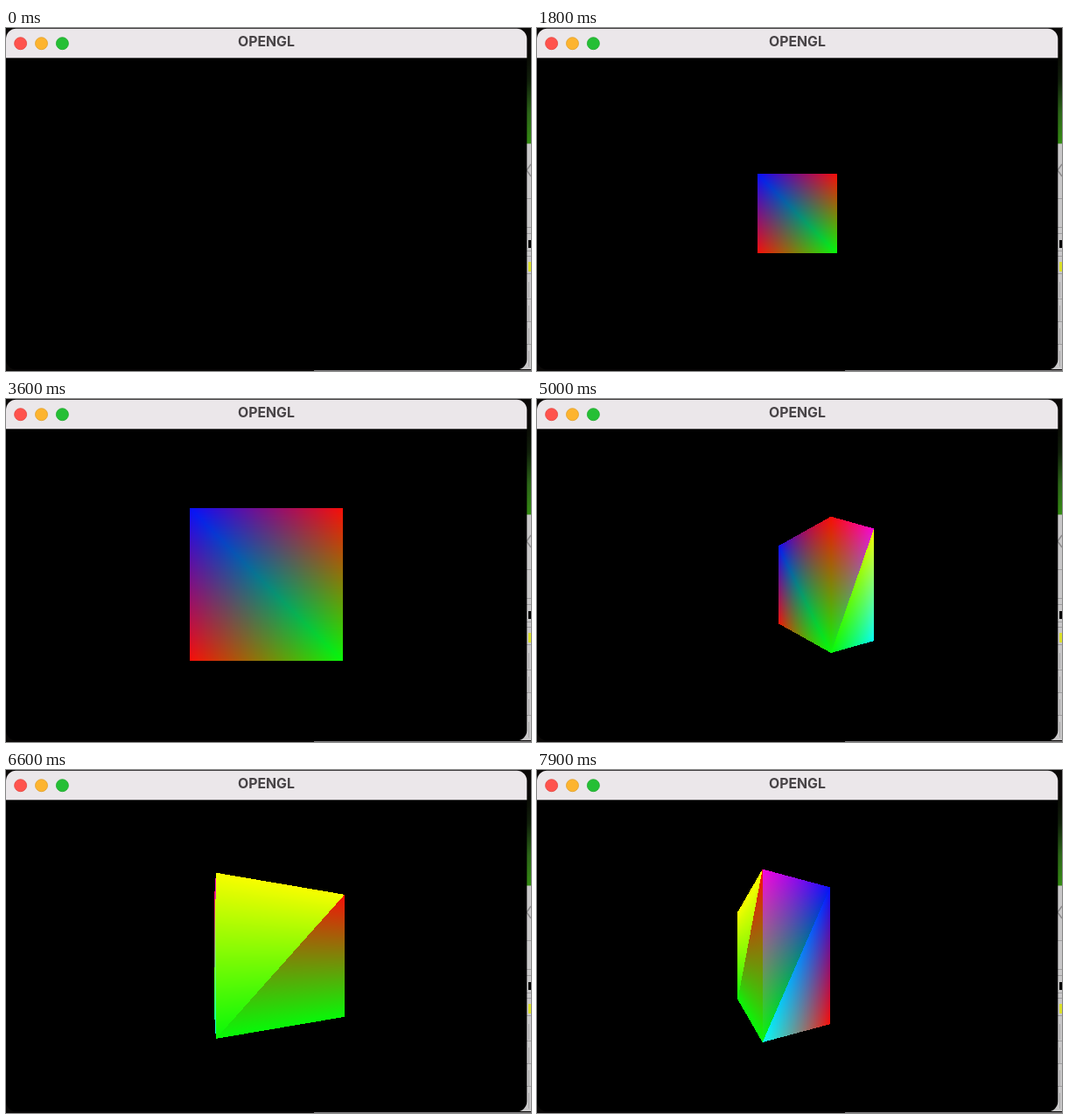
An HTML page with a canvas for the animation above (8 s loop, 600 px wide and 393 px high).

```html
<!DOCTYPE html>
<html lang="en">
<head>
<meta charset="utf-8">
<title>OPENGL</title>
<style>
  html, body { margin: 0; width: 100%; height: 100%; overflow: hidden; background: #000; }
  svg, canvas { position: absolute; left: 0; display: block; }
  svg { top: 0; }
  canvas { top: 34px; }
</style>
</head>
<body>
<svg width="600" height="393" viewBox="0 0 600 393">
  <defs>
    <linearGradient id="grass" x1="0" y1="0" x2="0" y2="1">
      <stop offset="0" stop-color="#090805"/>
      <stop offset=".3" stop-color="#10200a"/>
      <stop offset=".65" stop-color="#2c6618"/>
      <stop offset="1" stop-color="#358c13"/>
    </linearGradient>
    <clipPath id="frame"><rect y=".8" width="595.3" height="390.5" rx="11.5"/></clipPath>
  </defs>
  <!-- desktop showing around the window -->
  <rect width="600" height="393" fill="#0b0908"/>
  <rect x="585" y="30" width="15" height="103" fill="url(#grass)"/>
  <rect x="585" y="132.500" width="15" height="258.500" fill="#c9c8c9"/>
  <rect x="352" y="392" width="248" height="1" fill="#7c7b7c"/>
  <path d="M600 156l-5 7 5 7" fill="none" stroke="#8d8c8d" stroke-width="1.5"/>
  <path d="M595 195.500h5M595 228.500h5M595 235.500h5M595 255.500h5M595 261.500h5M595 281.500h5M595 310.500h5M595 336.500h5M595 362.500h5" stroke="#a09fa0"/>
  <path d="M597.500 291v18M597.500 318v18M597.500 344v18M597.500 370v18" stroke="#a9a8a9"/>
  <rect x="597" y="243" width="3" height="9" fill="#000"/>
  <rect x="597" y="268" width="3" height="11" fill="#dce02c"/>
  <!-- window -->
  <g clip-path="url(#frame)">
    <rect width="596" height="393" fill="#000"/>
    <rect width="596" height="34.300" fill="#ebe7ea"/>
  </g>
  <g stroke-width=".8">
    <circle cx="16.600" cy="17.700" r="7" fill="#ff534d" stroke="#e2463f"/>
    <circle cx="40.500" cy="17.700" r="7" fill="#fdb42f" stroke="#e0a028"/>
    <circle cx="64.400" cy="17.700" r="7" fill="#25bf35" stroke="#1da92c"/>
  </g>
  <text x="297.500" y="21" text-anchor="middle" font-family="Inter, Roboto, sans-serif" font-size="15.8" font-weight="700" fill="#474346">OPENGL</text>
</svg>
<canvas id="view" width="595" height="358"></canvas>
<script>
const W = 595, H = 358, FOCAL = 178.5, NEAR = 1;
const CX = 297.5, CY = 178.8;
const LOOP = 8000, TICK = 100;
const ctx = document.getElementById('view').getContext('2d');
const image = ctx.createImageData(W, H);

const RED = [248, 14, 8], GREEN = [8, 248, 8], BLUE = [8, 16, 250];
const YELLOW = [248, 253, 0], MAGENTA = [246, 6, 220], CYAN = [8, 252, 246];

// Floor plan corners: [x, depth]
const FL = [-1, 0], FR = [1, 0], BL = [-1, 1], BR = [1, 1];

// Each wall is two triangles sharing the diagonal from top of a to bottom of b.
// upper: top a, top b, bottom b; lower: top a, bottom a, bottom b
const walls = [
  { a: FL, b: FR, upper: [BLUE, RED, GREEN], lower: [BLUE, RED, GREEN] },
  { a: BR, b: FR, upper: [MAGENTA, RED, GREEN], lower: [YELLOW, CYAN, GREEN] },
  { a: BL, b: BR, upper: [YELLOW, YELLOW, GREEN], lower: [RED, GREEN, GREEN] },
  { a: FL, b: BL, upper: [BLUE, MAGENTA, GREEN], lower: [BLUE, RED, CYAN] }
];

// [time, distance] of the front face
const travel = [[380, 0], [500, .44], [850, .44], [1937, 4.42], [3093, .185], [3903, 3.155]];

function distanceAt(t) {
  if (t <= travel[0][0]) return travel[0][1];
  for (let i = 1; i < travel.length; i++) {
    const [t0, d0] = travel[i - 1], [t1, d1] = travel[i];
    if (t < t1) return d0 + (d1 - d0) * (t - t0) / (t1 - t0);
  }
  return travel[travel.length - 1][1];
}

const angleAt = t => Math.max(0, t - 4030) * .0624 * Math.PI / 180;

function nearestHit(dx, placed) {
  let best = null;
  for (const { wall, a, b } of placed) {
    const ex = b[0] - a[0], ez = b[1] - a[1];
    const u = (dx * a[1] - a[0]) / (ex - dx * ez);
    if (!(u >= 0 && u <= 1)) continue;
    const z = a[1] + u * ez;
    if (z > NEAR && (!best || z < best.z)) best = { wall, u, z };
  }
  return best;
}

function drawColumn(col, { wall, u, z }) {
  const px = image.data;
  for (let row = 0; row < H; row++) {
    const v = ((row + .5 - CY) * z / FOCAL + 1) / 2;
    if (v < 0 || v >= 1) continue;
    const [p, q, r] = v < u ? wall.upper : wall.lower;
    const wp = 1 - Math.max(u, v), wq = Math.abs(u - v), wr = Math.min(u, v);
    const o = (row * W + col) * 4;
    for (let c = 0; c < 3; c++) px[o + c] = p[c] * wp + q[c] * wq + r[c] * wr;
    px[o + 3] = 255;
  }
}

function render(t) {
  const dist = distanceAt(t), angle = angleAt(t);
  const cos = Math.cos(angle), sin = Math.sin(angle);
  const place = ([x, z]) => [x * cos + z * sin, dist - x * sin + z * cos];
  const placed = walls.map(wall => ({ wall, a: place(wall.a), b: place(wall.b) }));
  image.data.fill(0);
  for (let col = 0; col < W; col++) {
    const hit = nearestHit((col + .5 - CX) / FOCAL, placed);
    if (hit) drawColumn(col, hit);
  }
  ctx.putImageData(image, 0, 0);
}

let start = null, shown = -1;
function loop(now) {
  if (start === null) start = now;
  const t = Math.floor((now - start) % LOOP / TICK) * TICK;
  if (t !== shown) render(shown = t);
  requestAnimationFrame(loop);
}
requestAnimationFrame(loop);
</script>
</body>
</html>
```
